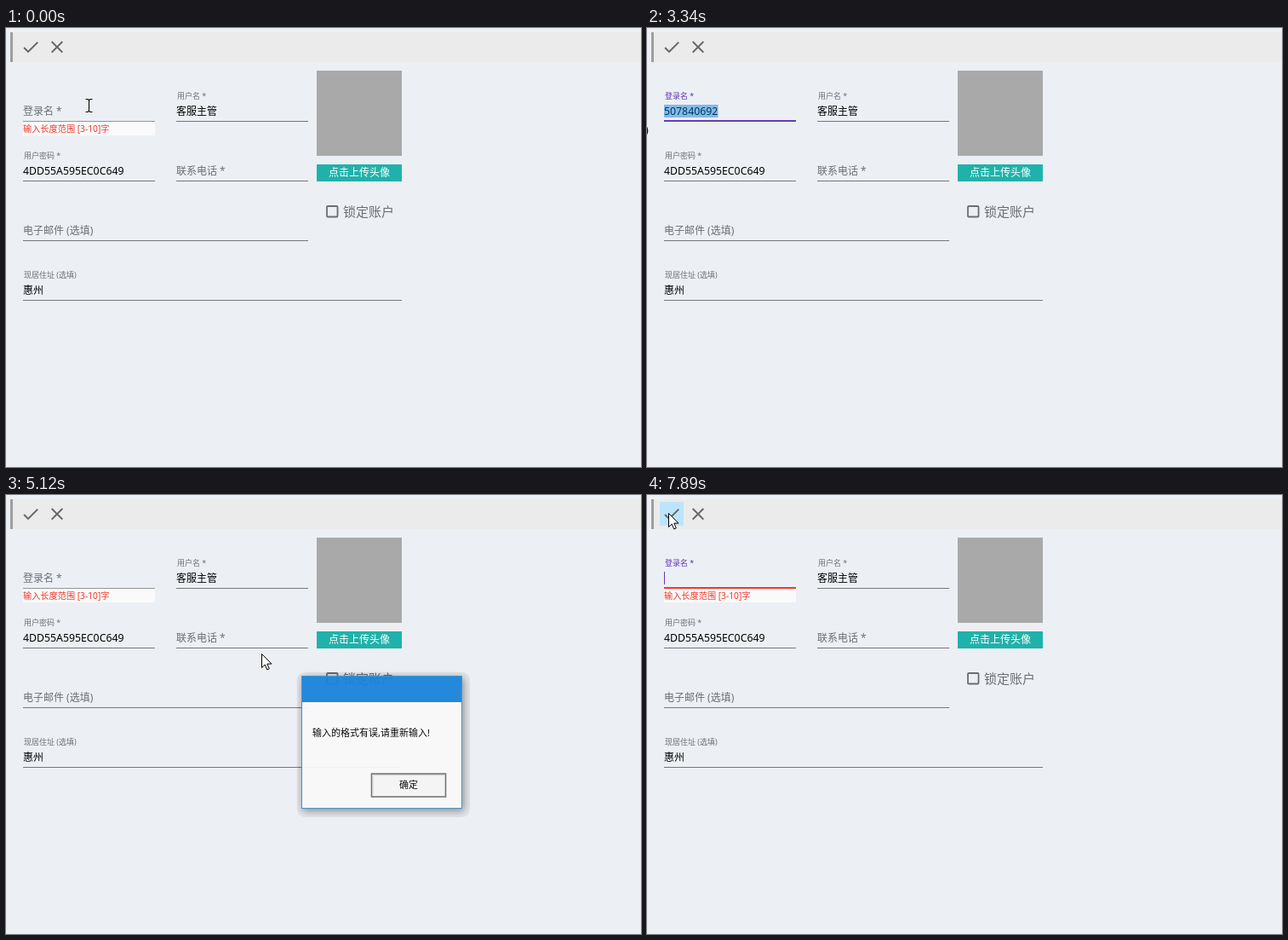
Write an HTML page that moves like this. It is 746 by 515 pixels and loops after 8000 ms.

```html
<!DOCTYPE html>
<html lang="zh-CN">
<head>
<meta charset="utf-8">
<title>账户表单</title>
<style>
html, body { margin: 0; width: 746px; height: 515px; overflow: hidden; background: #ecf0f4; }
svg { display: block; }
text { font-family: "Noto Sans", "Noto Sans CJK SC", "Noto Sans CJK", sans-serif; font-size: 12px; fill: #000; white-space: pre; }
.hint { fill: #6b6f73; }
.small { font-size: 9px; }
.mono { font-size: 12.3px; }
.line { fill: #74777a; }
.icon { fill: #666; }
.hover { fill: #bce5fd; }
</style>
</head>
<body>
<svg width="746" height="515" viewBox="0 0 746 515">
  <defs>
    <filter id="blur" x="-20%" y="-20%" width="140%" height="140%"><feGaussianBlur stdDeviation="4.5"/></filter>
  </defs>

  <rect x="5" y="5" width="741" height="35" fill="#ebebeb"/>
  <rect x="5" y="5" width="3" height="35" fill="#9e9e9e"/>
  <rect id="okHover" class="hover" x="15" y="8" width="28" height="28"/>
  <rect id="noHover" class="hover" x="46" y="8" width="28" height="28"/>
  <path class="icon" transform="translate(17 10.3)" d="M9 16.17 4.83 12 3.41 13.41 9 19 21 7 19.59 5.59Z"/>
  <path class="icon" transform="translate(48 10.3)" d="M19 6.41 17.59 5 12 10.59 6.41 5 5 6.41 10.59 12 5 17.59 6.41 19 12 13.41 17.59 19 19 17.59 13.41 12Z"/>

  <g id="fields"></g>

  <rect x="365" y="50" width="100" height="100" fill="#a9a9a9"/>
  <rect x="365" y="160" width="100" height="20" fill="#20b2aa"/>
  <text x="415" y="174" text-anchor="middle" style="fill:#fff">点击上传头像</text>
  <rect x="377" y="209" width="12.5" height="12.5" rx="1" fill="none" stroke="#6d6d6d" stroke-width="1.8"/>
  <text x="396" y="221" class="hint" style="font-size:15px">锁定账户</text>

  <rect class="line" x="20" y="109" width="155" height="1" id="baseLine"/>
  <rect id="focusLine" y="108" height="2"/>
  <g id="error">
    <rect x="20" y="110" width="155" height="16" fill="#fafafa"/>
    <text x="20" y="122" style="fill:#f0372b;font-size:10.2px">输入长度范围 [3-10]字</text>
  </g>
  <text id="label" x="20">登录名 *</text>
  <text id="value" class="mono" x="20" y="102"></text>
  <rect id="select" x="20" y="90" width="63.5" height="15" fill="#0078d7" opacity=".45"/>
  <rect id="caret" y="90" width="1" height="15" fill="#673ab7"/>

  <g id="dialog">
    <rect x="342" y="208" width="203" height="170" rx="9" fill="#000" opacity=".05"/>
    <rect x="348" y="214" width="190" height="157" rx="3" fill="#000" opacity=".38" filter="url(#blur)"/>
    <rect x="347.5" y="212.5" width="188" height="155" fill="#f9f9f9" stroke="#3f8fcb"/>
    <rect x="348" y="213" width="187" height="30" fill="#1a84da"/>
    <text x="360" y="283" style="font-size:11px">输入的格式有误,请重新输入!</text>
    <rect x="429.5" y="327" width="87" height="27" fill="#f5f5f5" stroke="#6f6f6f" stroke-width="1.6"/>
    <path d="M431 352V328.5H515" fill="none" stroke="#d0d0d0"/>
    <text x="473" y="344.2" text-anchor="middle" style="font-size:11px;font-weight:500">确定</text>
  </g>

  <path id="arrow" d="M.5.5V16.6L4.2 13.1 6.8 19 9.3 17.9 6.8 12.1H12Z" fill="#fff" stroke="#000"/>
  <g id="beam" fill="none">
    <path d="M-3.5-7.5H3.5M0-7.5V7.5M-3.5 7.5H3.5" stroke="#fff" stroke-width="2.4" opacity=".6"/>
    <path d="M-3.5-7.5H-1L.5-6.5 2-7.5H4.5M.5-7V7M-3.5 7.5H-1L.5 6.5 2 7.5H4.5" stroke="#000" stroke-width="1.1"/>
  </g>
  <ellipse id="edge" cx="-3" cy="120.5" rx="3.6" ry="6" fill="none" stroke="#111" stroke-width="1.4"/>
</svg>
<script>
const LOOP = 8000, LEFT = 20, WIDTH = 155, DIGIT = 7.04;
const LONG = '507840692', SHORT = '838';
const $ = id => document.getElementById(id);
const set = (id, attrs) => Object.entries(attrs).forEach(([k, v]) => $(id).setAttribute(k, v));
const show = (id, on) => set(id, { visibility: on ? 'visible' : 'hidden' });

// x, underline y, width, label, value
const fields = [
  [200, 109, 155, '用户名 *', '客服主管'],
  [20, 179, 155, '用户密码 *', '4DD55A595EC0C649'],
  [200, 179, 155, '联系电话 *', ''],
  [20, 249, 335, '电子邮件 (选填)', ''],
  [20, 319, 445, '现居住址 (选填)', '惠州']
];
$('fields').innerHTML = fields.map(([x, y, w, label, value]) =>
  `<rect class="line" x="${x}" y="${y}" width="${w}" height="1"/>` + (value
    ? `<text class="hint small" x="${x + 1}" y="${y - 25.7}">${label}</text>` +
      `<text class="${/\d/.test(value) ? 'mono' : ''}" x="${x}" y="${y - 7}">${value}</text>`
    : `<text class="hint" x="${x}" y="${y - 7}">${label}</text>`)).join('');

// Login field and dialog: each cue changes only what it names
const cues = [
  [0, { lift: 0, line: 0, text: '', error: true, focus: false, caret: false, select: false, dialog: 0 }],
  [120, { lift: .3, line: .61, focus: true }],
  [270, { lift: .85, line: .92 }],
  [390, { lift: 1, line: 1, caret: true }],
  [670, { text: LONG.slice(0, 3), error: false }],
  [820, { text: LONG.slice(0, 5) }],
  [970, { text: LONG.slice(0, 7) }],
  [1090, { text: LONG }],
  [1600, { caret: false }],
  [2090, { caret: true }],
  [2780, { caret: false, select: true }],
  [3580, { text: '', select: false, error: true, caret: true }],
  [4220, { focus: false, caret: false, lift: .9, line: .7 }],
  [4340, { lift: .48, line: .21 }],
  [4490, { lift: 0, line: 0, dialog: .5 }],
  [4610, { dialog: .85 }],
  [4730, { dialog: 1 }],
  [5120, { dialog: .95 }],
  [5240, { dialog: .4 }],
  [5360, { dialog: 0 }],
  [5510, { focus: true, lift: .35, line: .45 }],
  [5630, { lift: .85, line: .92 }],
  [5780, { lift: 1, line: 1, caret: true }],
  [5900, { text: SHORT, error: false }],
  [6410, { caret: false }],
  [6950, { caret: true }],
  [7350, { text: '', error: true }]
];

// Pointer: time, x, y
const pointer = [
  [0, 97, 91], [970, 100, 100], [1090, 96, 84], [1210, 80, 62], [1330, 58, 42], [1450, 50, 34],
  [1850, 38, 30], [1970, 9, 32], [2090, 16, 32], [2240, 9, 48], [2360, 40, 84], [2480, 91, 99],
  [2630, 92, 101], [2780, 26, 101], [3340, -20, 120], [3460, 2, 117], [3580, 6, 104],
  [3700, 11, 80], [3820, 17, 52], [3950, 25, 31], [4070, 31, 22], [4220, 30, 21],
  [4490, 60, 45], [4610, 230, 160], [4730, 400, 290], [4850, 466, 338],
  [5000, 430, 298], [5120, 300, 186], [5240, 150, 128], [5360, 89, 98],
  [6410, 91, 95], [6550, 87, 92], [7500, 84, 88], [7620, 77, 82], [7770, 40, 45], [7890, 25, 21]
];

const inside = (x, y, l, t, r, b) => x >= l && x <= r && y >= t && y <= b;

function draw(t) {
  const s = Object.assign({}, ...cues.filter(c => c[0] <= t).map(c => c[1]));
  const [, x, y] = pointer.filter(p => p[0] <= t).pop();

  const size = 12 - 3 * s.lift;
  set('label', { x: LEFT + s.lift, y: 97.4 - 17.4 * s.lift + size * .38,
    style: `font-size:${size}px;fill:${s.focus ? '#5f30b5' : '#6b6f73'}` });
  set('focusLine', { x: LEFT + WIDTH * (1 - s.line) / 2, width: WIDTH * s.line,
    fill: s.error ? '#f0372b' : '#673ab7' });
  set('baseLine', { opacity: s.error ? .75 : 1 });
  $('value').textContent = s.text;
  set('caret', { x: LEFT + Math.round(s.text.length * DIGIT) });
  show('caret', s.caret);
  show('select', s.select);
  show('error', s.error);
  set('dialog', { opacity: s.dialog });

  const typing = inside(x, y, LEFT, 72, LEFT + WIDTH, 110);
  set('beam', { transform: `translate(${x} ${y})` });
  set('arrow', { transform: `translate(${x} ${y})` });
  show('beam', typing);
  show('arrow', !typing && x >= 0);
  show('edge', x < 0);
  show('okHover', inside(x, y, 15, 8, 43, 36));
  show('noHover', inside(x, y, 46, 8, 74, 36));
}

const start = performance.now();
function tick() {
  draw((performance.now() - start) % LOOP);
  requestAnimationFrame(tick);
}
tick();
</script>
</body>
</html>
```
